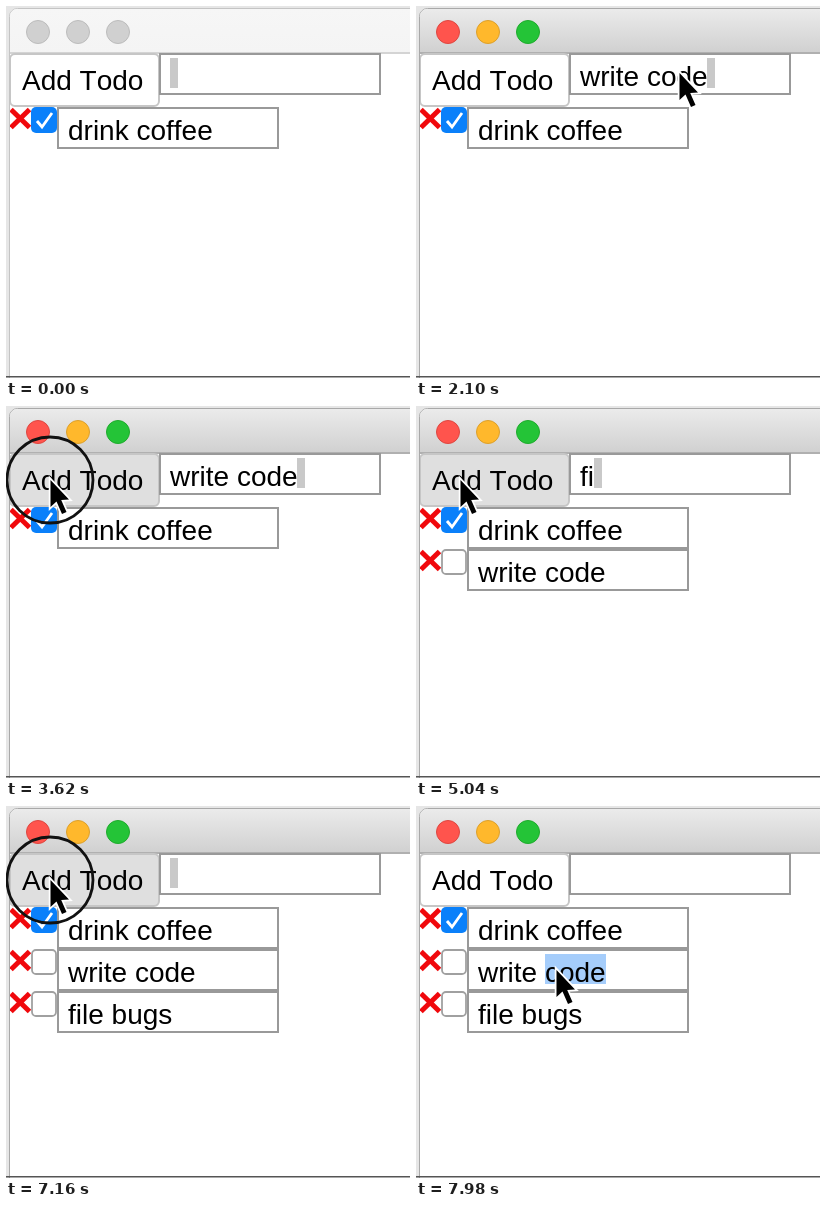
An HTML page with a canvas that plays this animation: 404x372 px, repeating every 8000 ms.

```html
<!DOCTYPE html>
<html>
<head>
<meta charset="utf-8">
<title>Todo list</title>
<style>
html, body { margin: 0; width: 100%; height: 100%; overflow: hidden; background: #fff; }
canvas { display: block; }
</style>
</head>
<body>
<canvas id="stage" width="404" height="372"></canvas>
<script>
const ctx = document.getElementById('stage').getContext('2d');
const LOOP = 8000, ACTIVE = 600, ADD1 = 3640, ADD2 = 7160, BLUR = 7880, SELECT = 7940;

// [time, text in the input from then on]
const typed = [[0, '']];
[...'write c'].forEach((_, i) => typed.push([1520 + i * 70, 'write c'.slice(0, i + 1)]));
typed.push([2080, 'write cod'], [2100, 'write code'], [ADD1, ''],
  [5040, 'fi'], [5160, 'file'], [5200, 'file '], [5340, 'file b'],
  [5480, 'file bu'], [5620, 'file bug'], [5720, 'file bugs'], [ADD2, '']);

// start, end, then quadratic curve points
const moves = [
  [20, 500, [390, 380], [330, 150], [263, 66]],
  [2920, 3240, [263, 66], [150, 114], [44, 73]],
  [7420, 7800, [44, 73], [70, 340], [140, 163]]
];
const presses = [[540, 660], [3480, 3660], [7160, 7260], [7900, 7970]];

function pointer(t) {
  const [a, b, p, q, r] = moves.filter(m => t >= m[0]).pop() || moves[0];
  const k = Math.min(1, Math.max(0, (t - a) / (b - a)));
  const e = k * k * (3 - 2 * k), n = 1 - e;
  return [0, 1].map(i => n * n * p[i] + 2 * n * e * q[i] + e * e * r[i]);
}

function box(x, y, w, h, r, fill, stroke, lw = 2) {
  ctx.beginPath();
  ctx.roundRect(x, y, w, h, r);
  ctx.fillStyle = fill;
  ctx.fill();
  if (stroke) {
    ctx.strokeStyle = stroke;
    ctx.lineWidth = lw;
    ctx.stroke();
  }
}

function circle(x, y, r, fill, stroke, lw) {
  box(x - r, y - r, 2 * r, 2 * r, r, fill, stroke, lw);
}

function line(points, color, lw) {
  ctx.beginPath();
  points.forEach(p => ctx.lineTo(...p));
  ctx.strokeStyle = color;
  ctx.lineWidth = lw;
  ctx.stroke();
}

function text(s, x, y) {
  ctx.fillStyle = '#000';
  ctx.fillText(s, x, y);
}

function drawWindow(active) {
  ctx.fillStyle = '#e6e6e6';
  ctx.fillRect(0, 0, 404, 372);
  box(3.5, 2.5, 420, 400, [8, 0, 0, 0], '#fff', active ? '#a9a9a9' : '#c4c4c4', 1);
  const bar = ctx.createLinearGradient(0, 3, 0, 47);
  bar.addColorStop(0, active ? '#ebebeb' : '#f6f6f6');
  bar.addColorStop(1, active ? '#d0d0d0' : '#f4f4f4');
  box(4, 3, 420, 44, [7, 0, 0, 0], bar);
  ctx.fillStyle = active ? '#b0b0b0' : '#d4d4d4';
  ctx.fillRect(4, 46, 400, 2);
  [['#ff544d', '#de4640'], ['#ffb82c', '#dda02a'], ['#24c437', '#1eab2c']].forEach(([fill, edge], i) =>
    circle(32 + 40 * i, 26, 11.5, active ? fill : '#d0d0d0', active ? edge : '#bcbcbc', 1));
}

function drawItem(label, y, done, selected) {
  line([[5, y + 2.5], [23.5, y + 20.5]], '#f0080c', 5);
  line([[23.5, y + 2.5], [5, y + 20.5]], '#f0080c', 5);
  if (done) {
    box(25, y, 26, 26, 5, '#0a80fa');
    line([[31, y + 14], [36, y + 20], [46, y + 6]], '#fff', 2.8);
  } else {
    box(26, y + 1, 24, 24, 4, '#fff', '#a0a0a0', 1.8);
  }
  box(52, y + 1, 220, 40, 0, '#fff', '#999');
  if (selected) {
    ctx.fillStyle = '#a5cdfb';
    ctx.fillRect(129, y + 5, 61, 30);
  }
  text(label, 62, y + 33);
}

function drawPointer(x, y, pressed) {
  if (pressed) {
    ctx.beginPath();
    ctx.arc(x, y + 1, 43, 0, 7);
    ctx.strokeStyle = '#111';
    ctx.lineWidth = 2.8;
    ctx.stroke();
  }
  ctx.beginPath();
  [[0, 0], [0, 27], [6, 21.5], [11.5, 34], [16, 32], [10.7, 20], [18.5, 19.5]]
    .forEach(([dx, dy]) => ctx.lineTo(x + dx + 0.5, y + dy + 1));
  ctx.closePath();
  ctx.strokeStyle = '#fff';
  ctx.lineWidth = 3.5;
  ctx.stroke();
  ctx.fillStyle = '#000';
  ctx.fill();
}

function draw(t) {
  const [x, y] = pointer(t);
  const hover = x < 153 && y > 48 && y < 101;
  const entry = typed.filter(k => t >= k[0]).pop()[1];
  ctx.font = '28px "Liberation Sans", Arial, sans-serif';
  ctx.fontKerning = 'none';
  ctx.textRendering = 'optimizeSpeed';

  drawWindow(t >= ACTIVE);
  ctx.save();
  ctx.beginPath();
  ctx.rect(4, 47, 400, 325);
  ctx.clip();
  box(4, 48, 149, 52, 5, hover ? '#dfdfdf' : '#fff', '#c6c6c6');
  text('Add Todo', 16, 84);
  box(154, 48, 220, 40, 0, '#fff', '#999');
  text(entry, 164, 80);
  if (t < BLUR) {
    ctx.fillStyle = '#c9c9c9';
    ctx.fillRect(Math.round(164 + ctx.measureText(entry).width - 0.4), 52, 8, 30);
  }
  drawItem('drink coffee', 101, true);
  if (t >= ADD1) drawItem('write code', 143, false, t >= SELECT);
  if (t >= ADD2) drawItem('file bugs', 185);
  ctx.restore();

  ctx.fillStyle = '#555';
  ctx.fillRect(0, 370, 404, 1.5);
  drawPointer(x, y, presses.some(([a, b]) => t >= a && t < b));
}

const start = performance.now();
function tick() {
  draw((performance.now() - start) % LOOP);
  requestAnimationFrame(tick);
}
tick();
</script>
</body>
</html>
```
